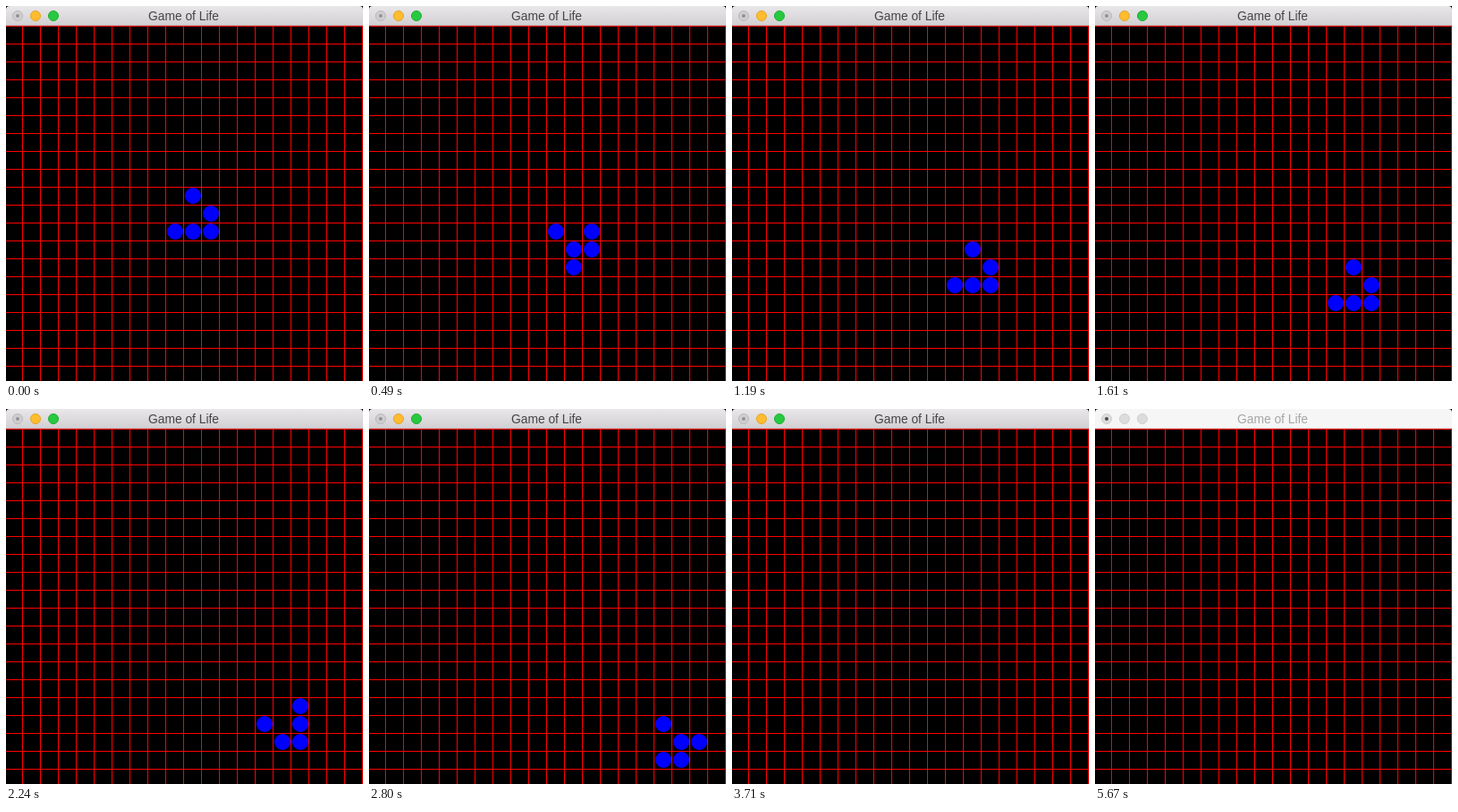
Animation, 399 px wide and 419 px high, one loop 5.74 s. Source, as an HTML page:

```html
<!DOCTYPE html>
<html lang="en">
<head>
<meta charset="utf-8">
<title>Game of Life</title>
<style>
  html, body { margin: 0; width: 100%; height: 100%; overflow: hidden; background: #000; }
  svg { display: block; width: 399px; height: 419px; }
  .bar { fill: url(#active); }
  .edge { fill: #b9b6b9; }
  .button { stroke-width: 1; }
  .close { fill: #d0ced0; stroke: #b9b7b9; }
  .minimize { fill: #ffbd2e; stroke: #e3a32c; }
  .zoom { fill: #28c940; stroke: #1bae32; }
  .dot { fill: #949294; }
  text { font: 13.8px "Liberation Sans", Arial, sans-serif; fill: #464446; text-anchor: middle; }
  .inactive .bar { fill: #f6f6f6; }
  .inactive .edge { fill: #d5d5d5; }
  .inactive .button { fill: #dcdcdc; stroke: #d0d0d0; }
  .inactive .dot { fill: #4c4c4c; }
  .inactive text { fill: #a6a6a6; }
</style>
</head>
<body>
<svg id="window" viewBox="0 0 399 419">
  <defs>
    <linearGradient id="active" x1="0" y1="0" x2="0" y2="1">
      <stop offset="0" stop-color="#e9e7e9"/>
      <stop offset="1" stop-color="#d1cfd1"/>
    </linearGradient>
  </defs>
  <rect width="399" height="419"/>
  <path class="bar" d="M0 22V4Q0 0 4 0H395Q399 0 399 4V22Z"/>
  <rect class="edge" y="21" width="399" height="1"/>
  <circle class="button close" cx="13" cy="11" r="5.5"/>
  <circle class="dot" cx="13" cy="11" r="2"/>
  <circle class="button minimize" cx="33" cy="11" r="5.5"/>
  <circle class="button zoom" cx="53" cy="11" r="5.5"/>
  <text x="198.5" y="16">Game of Life</text>
  <path id="grid" stroke="#f00"/>
  <path id="cells" fill="#00f"/>
</svg>
<script>
  const SIZE = 20, CELL = 20, TICK = 70, LOOP = 5740;
  const LAST_GENERATION = 36, INACTIVE_FROM = 5670;
  const CORNER = SIZE * SIZE - 1;
  const byId = id => document.getElementById(id);
  const indices = [...Array(SIZE).keys()];

  byId('grid').setAttribute('d', indices.map(i =>
    `M${18.5 + i * CELL} 22V419M0 ${22.5 + i * CELL}H399`).join(''));

  const inside = (x, y) => x >= 0 && y >= 0 && x < SIZE && y < SIZE;

  // The last cell of the board lives by the rules but is not counted by its neighbours.
  function countNeighbours(alive, x, y) {
    let count = 0;
    for (let dy = -1; dy <= 1; dy++)
      for (let dx = -1; dx <= 1; dx++) {
        const index = (y + dy) * SIZE + x + dx;
        if ((dx || dy) && inside(x + dx, y + dy) && index !== CORNER && alive.has(index)) count++;
      }
    return count;
  }

  function nextGeneration(alive) {
    const next = new Set();
    for (const y of indices)
      for (const x of indices) {
        const index = y * SIZE + x;
        const count = countNeighbours(alive, x, y);
        if (count === 3 || (count === 2 && alive.has(index))) next.add(index);
      }
    return next;
  }

  const disc = index => {
    const x = 180 + (index % SIZE - 9) * CELL;
    const y = 212 + (Math.floor(index / SIZE) - 9) * CELL;
    return `M${x} ${y}a9 9 0 1 0 18 0a9 9 0 1 0 -18 0`;
  };

  const glider = [[10, 9], [11, 10], [9, 11], [10, 11], [11, 11]];
  let alive = new Set(glider.map(([x, y]) => y * SIZE + x));
  const shapes = [];
  for (let n = 0; n <= LAST_GENERATION; n++) {
    shapes.push([...alive].map(disc).join(''));
    alive = nextGeneration(alive);
  }

  const start = performance.now();
  function draw() {
    const time = (performance.now() - start) % LOOP;
    const tick = Math.floor(time / TICK);
    // Two generations pass in every three ticks.
    const generation = Math.min(LAST_GENERATION, Math.floor((2 * tick + 2) / 3));
    byId('cells').setAttribute('d', shapes[generation]);
    byId('window').classList.toggle('inactive', time >= INACTIVE_FROM);
    requestAnimationFrame(draw);
  }
  draw();
</script>
</body>
</html>
```
